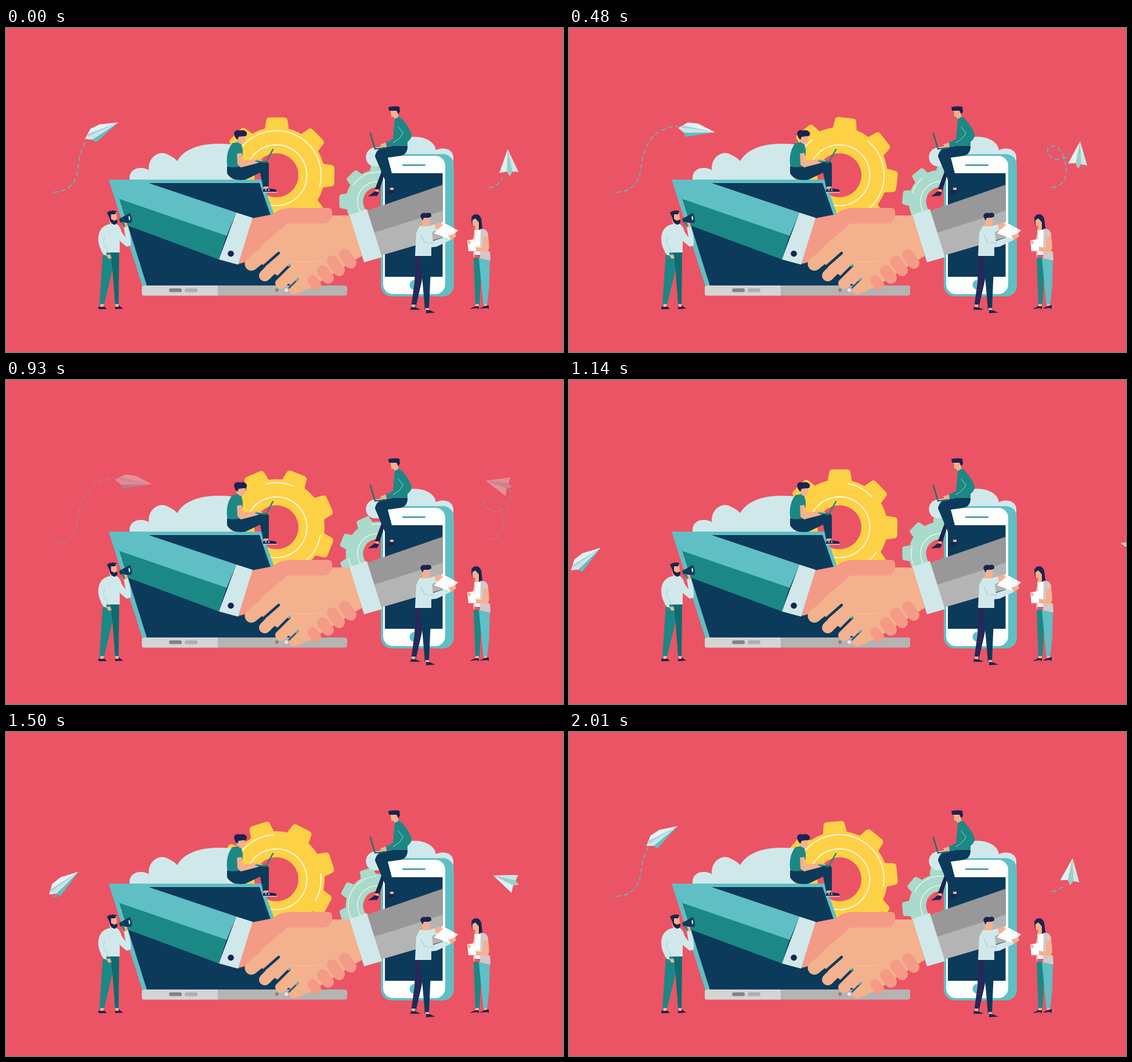
Write an HTML page that moves like this. It is 960 by 560 pixels and loops after 2040 ms.

```html
<!DOCTYPE html>
<html lang="en">
<head>
<meta charset="utf-8">
<title>Handshake</title>
<style>
html, body { margin: 0; height: 100%; overflow: hidden; background: #eb5464; }
svg { display: block; width: 960px; height: 560px; }
.navy { fill: #0c3a5b; } .ink { fill: #1c2350; } .teal { fill: #1b8886; } .aqua { fill: #5fbfc4; }
.pale { fill: #d1e8eb; } .skin { fill: #f4b18d; } .salmon { fill: #f39b86; } .white { fill: #fcfdfd; }
.line { fill: none; stroke-linecap: round; stroke-linejoin: round; }
.trail { fill: none; stroke: #6bb1bb; stroke-width: 2; }
.route { fill: none; }
</style>
</head>
<body>
<svg viewBox="0 0 960 560">
  <g id="big" fill="#fdd146" stroke="#fdd146"></g>
  <g id="small" fill="#a9dacb" stroke="#a9dacb"></g>

  <!-- clouds -->
  <g class="pale">
    <path d="M213 262C211 240 237 238 246 246C244 222 266 209 281 220Q290 224 295 230C310 203 350 197 388 201V262Z"/>
    <path d="M634 239C614 236 616 205 640 206Q660 203 688 190C712 184 738 192 741 211C752 205 771 208 771 224V240Z"/>
  </g>

  <!-- phone -->
  <rect class="aqua" x="646" y="218" width="126" height="246" rx="19"/>
  <rect class="white" x="650" y="221" width="107" height="239" rx="17"/>
  <rect class="navy" x="653" y="251" width="99.500" height="179"/>
  <path class="line" d="M684 237H722" stroke="#1b8886" stroke-width="2"/>
  <circle class="aqua" cx="704" cy="444" r="8.500"/>

  <!-- laptop -->
  <path class="aqua" d="M177 262H441L505 446H235Z"/>
  <path class="navy" d="M187 268H437L498 446H243Z"/>
  <path class="aqua" d="M183 268H246L397 319L380 360L196 296Z"/>
  <path class="teal" d="M196 296L380 359L367 400L211 342Z"/>
  <rect x="234" y="445" width="354" height="17.500" rx="4" fill="#b4b4b4"/>
  <path d="M365 445H238Q234 445 234 449V458.500Q234 462.500 238 462.500H365Z" fill="#d4d4d4"/>
  <rect x="281" y="450" width="22" height="6.500" rx="3.250" fill="#828585"/>
  <rect x="308" y="450" width="22" height="6.500" rx="3.250" fill="#adafaf"/>
  <circle cx="467" cy="453" r="3" fill="#808585"/>
  <circle cx="483" cy="453" r="3" fill="#e4e9e9"/>

  <!-- sleeves -->
  <path d="M622 316L752.500 271V318L634 355Z" fill="#989898"/>
  <path d="M634 354L752.500 316V362L647 393Z" fill="#b4b4b4"/>

  <!-- hands -->
  <path class="salmon" d="M424 329L460 322Q472 311 490 311H555Q562 311 562 318V340L485 352L430 400L400 408Z"/>
  <path class="skin" d="M485 338H548Q560 337 562 324H594L613 394L540 440L508 457L470 430L430 400L440 376Z"/>
  <g class="line" stroke="#f4b18d">
    <path d="M494 349L423 408" stroke-width="23"/>
    <path d="M500 374L446 428" stroke-width="20"/>
    <path d="M512 400L474 441" stroke-width="20"/>
    <path d="M535 424L497 451" stroke-width="19"/>
  </g>
  <g class="line" stroke="#0c3a5b" stroke-width="4.500">
    <path d="M470 389L438 417"/>
    <path d="M488 411L462 437"/>
    <path d="M503 434L488 449" stroke="#2a5d72" stroke-width="3"/>
  </g>
  <path d="M490 408L486 412M503 433L499 437" stroke="#5fbfc4" stroke-width="3"/>
  <path d="M490 404H546" stroke="#f8dba9" stroke-width="1.200" stroke-dasharray="2 3"/>
  <g class="line" stroke="#f39b86" stroke-width="20">
    <path d="M584 392L594 406"/>
    <path d="M563 403L574 419"/>
    <path d="M546 420L555 432"/>
    <path d="M528 436L534 444" stroke-width="18"/>
  </g>
  <path class="pale" d="M397 319L425 328L400 409L367 400Z"/>
  <circle class="ink" cx="387.500" cy="390" r="5.300"/>
  <path class="pale" d="M592 323L622 313L648 396L617 405Z"/>

  <!-- man with megaphone -->
  <path class="teal" d="M167 386H190L182 424L169 479H161Z"/>
  <path d="M180 387H195L194 479H188L184 424Z" fill="#0e6c6f"/>
  <path class="ink" d="M160 481L168 480L174 486H159ZM188 481L195 480L202 485L188 486Z"/>
  <path class="skin" d="M163 477H169L168 482H162ZM188 477H194V482H189ZM177 320H190L192 334L188 341H180L178 334ZM172 392H180L182 398L177 399Z"/>
  <path class="pale" d="M178 339L190 338Q197 342 199 352L206 362L203 344L210 342Q216 362 215 376L208 378L196 368V388H173V393L168 392Q156 372 160 356Q164 342 178 339Z"/>
  <path class="line" d="M170 360L168 371L176 388" stroke="#b3d3d8" stroke-width="1.200"/>
  <path class="ink" d="M174 319Q180 314 190 316L188 322L181 322V330L186 333L192 331Q193 339 187 340Q179 338 178 328Z"/>
  <path class="skin" d="M201 337L208 335L210 343L203 346Z"/>
  <path class="navy" d="M195 330L213 320Q219 327 216 337L197 336Z"/>
  <path class="pale" d="M212 324Q216 328 213 333Q210 329 212 324Z"/>
  <path class="line" d="M201 336L204 342" stroke="#1b8886" stroke-width="3"/>

  <!-- man on the laptop -->
  <path class="teal" d="M390 199L402 197Q409 203 408 218L402 242H382Q377 216 390 199Z"/>
  <path class="navy" d="M381 239Q390 243 410 238L432 230H447Q454 231 453 239L453 274L443 275L438 250L413 262Q389 266 381 251Z"/>
  <path class="skin" d="M397 186H412V195L409 200H403L397 195ZM398 217L406 216L409 229L434 226L443 229L432 234L405 241L399 236ZM445 274H452V279H445Z"/>
  <path class="ink" d="M393 182Q395 175 403 177Q412 175 415 181Q416 188 410 187L401 188L399 193Q394 190 393 182ZM443 279L452 277L465 279L467 283L443 284Z"/>
  <path d="M443 284H467M448 278V282M453 278V282" stroke="#fff" stroke-width="1.200"/>
  <path class="line" d="M460 210L448 232L431 230" stroke="#1b8886" stroke-width="2.500"/>

  <!-- man on the phone -->
  <path class="ink" d="M636 219L657 236L643 283L635 281L648 246Z"/>
  <path class="navy" d="M692 203Q693 218 680 221L658 224L665 251L669 278L660 279L636 222Q638 209 650 207L665 204Z"/>
  <path class="skin" d="M636 279H643L642 285L635 284ZM662 276H668V281H662ZM663 143H675L676 150L677 156L670 158L668 154L664 153ZM645 201L655 198L659 204L648 208Z"/>
  <path class="ink" d="M624 291L636 282L643 284L640 290ZM656 288L661 280L669 280L668 285Z"/>
  <path class="teal" d="M670 157L678 153Q689 162 698 180Q702 189 692 197V204H663L656 206L655 198L667 192Z"/>
  <path class="line" d="M676 171L684 181Q681 191 667 198" stroke="#a5d3cb" stroke-width="1"/>
  <path class="ink" d="M659 137Q667 134 678 136L679 145L676 149L673 143L660 143Z"/>
  <path class="line" d="M628 182L636 209L654 207" stroke="#17706f" stroke-width="2.500"/>

  <!-- man with a sheet -->
  <path d="M706 392H724L716 440L706 484H698L704 440Z" fill="#26285a"/>
  <path class="navy" d="M713 392H733L731 440L729 487H722L718 440Z"/>
  <path class="skin" d="M699 478H706L705 484H698ZM723 484H729V489H723ZM717 328H731L730 341L725 346L717 343Z"/>
  <path class="ink" d="M698 482L706 483L715 487H697ZM724 487L731 488L740 492L724 493Z"/>
  <path class="pale" d="M713 342L726 343L740 339L744 347L734 353L736 368L763 359L767 366L742 378L733 379V394H705L707 354Z"/>
  <path class="line" d="M716 358L721 371L737 372" stroke="#a7cdd4" stroke-width="1.200"/>
  <path class="ink" d="M714 325Q716 318 724 320Q734 317 733 326L728 328L720 328L718 333Z"/>
  <path class="white" d="M752 335L779 350L764 364L738 355Z"/>
  <path class="skin" d="M739 339L748 336L753 340L745 348L740 347ZM762 359L774 355L776 360L767 366Z"/>

  <!-- woman -->
  <path class="teal" d="M806 397H822L818 440L816 480H809Z"/>
  <path class="aqua" d="M815 397H834L833 445L829 480H823L819 440Z"/>
  <path class="skin" d="M809 477H815V483H809ZM824 477H829V483H824ZM804 329H816V346L820 351H807L809 343L804 341Z"/>
  <path class="ink" d="M799 486L808 481H815V486L811 484ZM816 485L824 481L832 479V486L829 484ZM802 330Q803 321 812 322Q820 324 820 338L822 353L815 352V336L809 329L804 332V345Z"/>
  <path class="white" d="M807 350L819 348V392H808Z"/>
  <path d="M818 347Q829 346 831 356V372L823 374L825 386L834 386L835 402L817 398ZM808 350L804 369L806 399L809 386Z" fill="#d3c8c9"/>
  <path class="skin" d="M822 362L831 360Q835 384 829 387L810 386L808 378L822 380Z"/>
  <path class="white" d="M795 367L808 365L810 385L797 386Z"/>
  <path class="skin" d="M797 367L802 370L799 374L795 371Z"/>

  <!-- paper planes -->
  <g id="left">
    <path class="route" d="M4 326L62 286C88 268 120 250 133 229C142 214 145 189 159 180C172 172 189 171 203 171C209 171 213 175 220 176"/>
    <path class="trail" d="M82 284C115 282 122 262 125 235C128 205 145 171 188 170"/>
    <g class="plane"><g transform="translate(-32)">
      <path class="aqua" d="M9 6L15 15L64 -1Z"/>
      <path d="M0 2L15 -10L33 -11L64 -1L11 8Z" fill="#e6f2f4"/>
      <path d="M0 2L64 -1L11 8Z" fill="#cde4e7"/>
      <path d="M7 -4L64 -1L5 1Z" fill="#a9d5d8"/>
    </g></g>
  </g>
  <g id="right">
    <path class="route" d="M1010 294L920 276C870 265 811 226 805 256C799 285 855 281 864 247C872 217 855 196 831 203C806 209 880 250 879 213C878 180 873 186 846 179"/>
    <path class="trail" d="M832 276C850 274 859 260 857 243C855 222 846 204 833 204C822 204 822 215 832 224C846 234 866 222 870 205Q872 196 868 188"/>
    <g class="plane"><g transform="translate(-20)">
      <path d="M40 0L0 -17L2 -3L1 5L0 16Z" fill="#e2f0f1"/>
      <path d="M40 0L1 -4L-7 1L2 6Z" fill="#9bcfc8"/>
      <path d="M40 0L2 6L0 16Z" fill="#cfe6e6"/>
    </g></g>
  </g>
</svg>
<script>
const STEP = 30, FRAMES = 68, HOLD = 26, RESUME = 34;
const DASH = 8, GAP = 5;
const $ = s => document.querySelector(s);

function buildGear(id) {
  let s = '<circle r="60.5" fill="none" stroke-width="45"/>';
  for (let a = 0; a < 360; a += 45)
    s += `<path d="M-21 -78L-18.5 -94Q-18 -100 -12 -100H12Q18 -100 18.5 -94L21 -78Z" stroke="none" transform="rotate(${a})"/>`;
  s += '<g fill="none" stroke="#fff9e8" stroke-width="1.8"><circle r="52.5"/>' +
    '<circle r="77" pathLength="360" stroke-dasharray="162 85 37 76" transform="rotate(-147)"/></g>';
  $(id).innerHTML = s;
}

// A plane follows its route nose first, slowing down; its trail grows behind it.
function makePlane(id, frames, power, lead) {
  const group = $(id), route = $(id + ' .route'), trail = $(id + ' .trail'), body = $(id + ' .plane');
  const total = route.getTotalLength(), trailLength = trail.getTotalLength();
  return (age, alpha) => {
    const left = total * Math.max(0, 1 - age / frames) ** power;
    const at = d => route.getPointAtLength(total - left + d);
    const { x, y } = at(0), back = at(-1), front = at(1);
    const heading = Math.atan2(front.y - back.y, front.x - back.x) * 180 / Math.PI;
    body.setAttribute('transform', `translate(${x} ${y}) rotate(${heading})`);

    const shown = Math.max(0, trailLength + lead - left), period = DASH + GAP;
    const dashes = `${DASH} ${GAP} `.repeat(Math.floor(shown / period));
    trail.setAttribute('stroke-dasharray', dashes + Math.min(DASH, shown % period) + ' 999');
    group.setAttribute('opacity', alpha);
  };
}

buildGear('#big');
buildGear('#small');
const planes = [makePlane('#left', 48, 1.3, 0), makePlane('#right', 60, 1.2, 25)];

function draw(now) {
  const n = Math.floor(now / STEP) % FRAMES;
  const age = (n < RESUME ? Math.min(n, HOLD) + FRAMES : n) - RESUME;
  const alpha = n > HOLD && n < RESUME ? (RESUME - n) / (RESUME - HOLD) : 1;
  const turn = age * 6 + 156.5;
  $('#big').setAttribute('transform', `translate(466 254.5) rotate(${turn})`);
  $('#small').setAttribute('transform', `translate(640.5 300) scale(.66) rotate(${turn})`);
  planes.forEach(move => move(age, alpha));
}

const start = performance.now();
function loop() {
  draw(performance.now() - start);
  requestAnimationFrame(loop);
}
loop();
</script>
</body>
</html>
```
